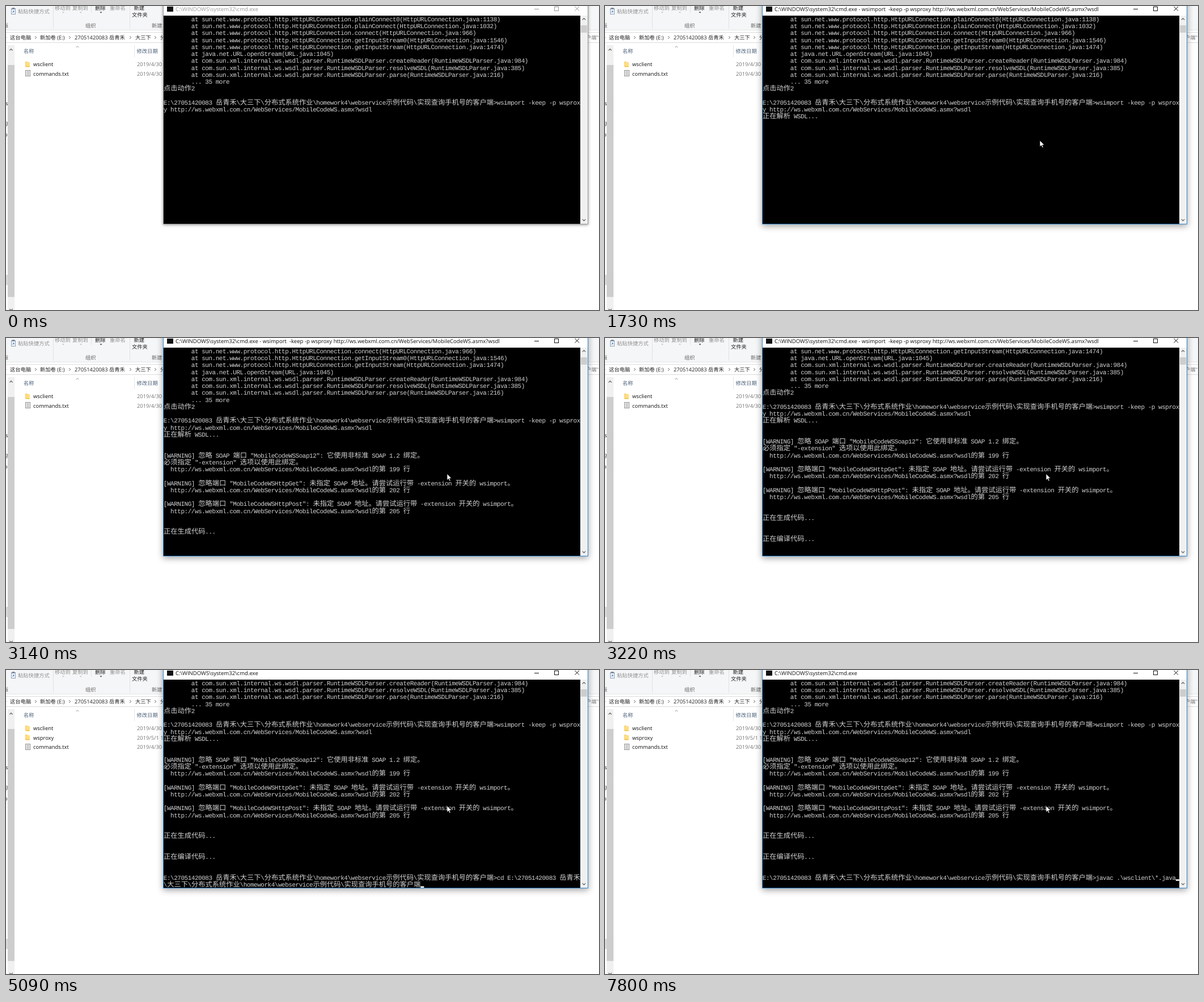
Write an HTML page with a canvas that moves like this. It is 1046 px wide and 536 px high and loops after 8000 ms.

```html
<!DOCTYPE html>
<html lang="zh-CN">
<head>
<meta charset="utf-8">
<title>wsimport</title>
<style>
html, body { margin: 0; width: 100%; height: 100%; overflow: hidden; background: #fff; }
canvas { display: block; }
</style>
</head>
<body>
<canvas id="stage" width="1046" height="536"></canvas>
<script>
const ctx = document.getElementById("stage").getContext("2d");
const LOOP = 8000;
const UI = '"Open Sans", "Noto Sans CJK SC", "Noto Sans CJK", sans-serif';
const LATIN = '11px "Liberation Mono", monospace';
const HAN = '300 12.25px "Noto Sans CJK SC", "Noto Sans CJK", sans-serif';
const COLS = 120, CELL = 6.125, ROW = 12.25, LEFT = 278, TOP = 17;

// Console contents
const OWNER = "27051420083 岳青禾";
const DIR = `E:\\${OWNER}\\大三下\\分布式系统作业\\homework4\\webservice示例代码\\实现查询手机号的客户端`;
const URL_WSDL = "http://ws.webxml.com.cn/WebServices/MobileCodeWS.asmx?wsdl";
const IMPORT = "wsimport -keep -p wsproxy " + URL_WSDL;
const TITLE = "C:\\WINDOWS\\system32\\cmd.exe";
const at = (pkg, method, file, line) => `        at ${pkg}.${method}(${file}.java:${line})`;
const http = (method, line) =>
  at("sun.net.www.protocol.http.HttpURLConnection", method, "HttpURLConnection", line);
const parser = (method, line) =>
  at("com.sun.xml.internal.ws.wsdl.parser.RuntimeWSDLParser", method, "RuntimeWSDLParser", line);
const lineOf = n => `  ${URL_WSDL}的第 ${n} 行`;
const noAddress = port =>
  `[WARNING] 忽略端口 "MobileCodeWS${port}": 未指定 SOAP 地址。请尝试运行带 -extension 开关的 wsimport。`;

const TRACE = [
  http("plainConnect0", 1138), http("plainConnect", 1032), http("connect", 966),
  http("getInputStream0", 1546), http("getInputStream", 1474),
  at("java.net.URL", "openStream", "URL", 1045),
  parser("createReader", 984), parser("resolveWSDL", 385), parser("parse", 216),
  "        ... 35 more", "点击动作2", "", DIR + ">" + IMPORT
];
const PARSING = ["正在解析 WSDL...", "", ""];
const WARNINGS = [
  '[WARNING] 忽略 SOAP 端口 "MobileCodeWSSoap12": 它使用非标准 SOAP 1.2 绑定。',
  '必须指定 "-extension" 选项以使用此绑定。', lineOf(199), "",
  noAddress("HttpGet"), lineOf(202), "",
  noAddress("HttpPost"), lineOf(205), "", "",
  "正在生成代码...", "", ""
];
const COMPILING = ["正在编译代码...", "", ""];

function consoleLines(t) {
  const lines = [...TRACE];
  if (t >= 1730) lines.push(...PARSING);
  if (t >= 3140) lines.push(...WARNINGS);
  if (t >= 3220) lines.push(...COMPILING);
  if (t >= 4140) {
    const command = t < 5090 ? IMPORT : t < 5630 ? "cd " + DIR : "javac .\\wsclient\\*.java";
    lines.push(DIR + ">" + command);
  }
  return lines;
}

const scrollAt = t => t < 3140 ? 0 : t < 3220 ? 2 : t < 4140 ? 4 : 6;

// Caret periods: start, end, column, screen row
const CARETS = [
  [990, 1350, 60, 13], [1350, 1510, 0, 14], [2510, 3060, 0, 17],
  [4140, 4630, 60, 29], [5090, 5630, 74, 29],
  [5800, 6270, 119, 28], [6790, 7260, 119, 28], [7800, 8000, 119, 28]
];

function box(x, y, w, h, color) {
  ctx.fillStyle = color;
  ctx.fillRect(x, y, w, h);
}

function label(text, x, mid, color = "#222", size = 9.3) {
  ctx.font = `${size}px ${UI}`;
  ctx.fillStyle = color;
  ctx.fillText(text, x, mid + size * 0.36);
}

function stroke(color, width, ...points) {
  ctx.strokeStyle = color;
  ctx.lineWidth = width;
  ctx.beginPath();
  points.forEach(([x, y]) => ctx.lineTo(x, y));
  ctx.stroke();
}

// Small open arrowhead: dx, dy give the direction of its tip
function chevron(x, y, dx, dy, color = "#444", s = 2.6, width = 1.1) {
  const back = (side) => [x - dx * s / 2 + dy * side * s, y - dy * s / 2 + dx * side * s];
  stroke(color, width, back(-1), [x + dx * s / 2, y + dy * s / 2], back(1));
}

function dropMark(x, y, color) {
  ctx.fillStyle = color;
  ctx.beginPath();
  ctx.moveTo(x - 2, y - 1);
  ctx.lineTo(x + 2, y - 1);
  ctx.lineTo(x, y + 1);
  ctx.fill();
}

function folder(y) {
  box(34, y - 5, 4, 9, "#f4cf66");
  box(35, y - 4, 7, 9, "#ffdd83");
  box(34, y + 3, 7, 1, "#eabf52");
}

function textFile(y) {
  box(34, y - 6, 9, 11, "#8c8c8c");
  box(35, y - 5, 7, 9, "#fff");
  for (let i = 0; i < 4; i++) box(36, y - 4 + i * 2, 5, 1, "#a0a0a0");
}

function drawRibbon() {
  const gray = "#929292", group = "#666";
  box(0, 0, 1046, 42, "#f5f6f7");
  box(0, 42, 1046, 1, "#e3e4e5");
  for (const x of [83, 218]) box(x, 0, 1, 40, "#e1e2e3");
  box(150, 0, 1, 12, "#e1e2e3");
  box(9, 4, 8, 11, "#8fa0b3");
  box(10, 6, 6, 8, "#f3f7fb");
  box(11, 3, 4, 2, "#71849a");
  stroke("#5285bd", 1, [11.5, 12], [14, 9], [12, 9], [14, 9], [14, 11]);
  label("粘贴快捷方式", 21, 9.5, gray);
  label("移动到", 86, 4, gray);
  label("复制到", 117, 4, gray);
  label("删除", 157, 4);
  label("重命名", 183, 4, gray);
  label("新建", 225.5, 4);
  label("文件夹", 222, 16);
  dropMark(101, 11.5, "#bbb");
  dropMark(132, 11.5, "#bbb");
  dropMark(167.5, 11.5, "#222");
  label("板", -5, 34.5, group);
  label("组织", 140, 34.5, group);
  label("新建", 257, 34.5, group);
}

function drawAddress() {
  box(0, 46, 1046, 1, "#dcdcdc");
  box(0, 64, 1046, 1, "#dcdcdc");
  label("这台电脑", 7, 55.5);
  label("新加卷 (E:)", 60, 55.5);
  label(OWNER, 121, 55.5);
  label("大三下", 228, 55.5);
  label("分布式系统作业", 272, 55.5);
  for (const x of [-1, 52.5, 112.5, 219.5, 263.5]) chevron(x, 55.5, 1, 0, "#555", 2.3, 1);
  label('户端"', 1023, 56, "#777");
}

function drawFiles(t) {
  label("s", -1, 172);
  label("的", -6, 208);
  label("o", -3, 227);
  box(0, 474, 3, 18, "#d9d9d9");
  box(3, 69, 12, 467, "#f0f0f0");
  box(3, 104, 12, 409, "#cdcdcd");
  chevron(9, 77, 0, -1);
  chevron(9, 535.5, 0, 1);
  label("名称", 31, 80, "#4c607a");
  label("修改日期", 230.5, 80, "#4c607a");
  chevron(126, 72, 0, -1, "#777", 2.4, 0.8);
  box(226, 69, 1, 21, "#e5e5e5");

  const files = [["wsclient", "2019/4/30"], ["commands.txt", "2019/4/30"]];
  if (t >= 4220) files.splice(1, 0, ["wsproxy", "2019/5/1 10:23"]);
  files.forEach(([name, date], i) => {
    const y = 103 + i * 16.5;
    (name.endsWith(".txt") ? textFile : folder)(Math.round(y - 0.5));
    label(name, 48, y, "#111", 9.4);
    label(date, 231, y, "#747474");
  });
}

function drawWindow(t) {
  const active = t >= 430;
  const ink = active ? "#111" : "#999";
  ctx.save();
  ctx.shadowColor = active ? "rgba(0,0,0,.38)" : "rgba(0,0,0,.42)";
  ctx.shadowBlur = active ? 11 : 5;
  ctx.shadowOffsetY = active ? 3 : 1;
  box(277, -12, 750, 397, active ? "#2f86cf" : "#9a9a9a");
  ctx.restore();
  box(278, 0, 748, 17, "#fff");
  box(284, 1, 11, 9, "#111");
  const running = t >= 1350 && t < 4140;
  label(TITLE + (running ? " - " + IMPORT.replace(" ", "  ") : ""), 299, 5.2, ink, 9.55);
  box(932, 5, 8, 1, ink);
  ctx.strokeStyle = ink;
  ctx.lineWidth = 1;
  ctx.strokeRect(967.5, 1.5, 7, 7);
  stroke(ink, 1, [1003.5, 1], [1011, 8.5]);
  stroke(ink, 1, [1011, 1], [1003.5, 8.5]);

  box(LEFT, TOP, 735, 367, "#000");
  box(1013, TOP, 13, 367, "#f0f0f0");
  box(1014, 34, 11, 13, "#cdcdcd");
  chevron(1019.5, 23, 0, -1);
  chevron(1019.5, 377.5, 0, 1);
}

function drawConsole(t) {
  let row = -scrollAt(t);
  ctx.save();
  ctx.beginPath();
  ctx.rect(LEFT, TOP, 735, 367);
  ctx.clip();
  ctx.fillStyle = "#d2d2d2";
  for (const line of consoleLines(t)) {
    let col = 0;
    for (const ch of line) {
      const wide = ch > "\u2e80";
      if (col >= COLS) { col = 0; row++; }
      if (row >= 0 && ch !== " ") {
        ctx.font = wide ? HAN : LATIN;
        ctx.fillText(ch, LEFT + col * CELL - (wide ? 0 : 0.2), TOP + row * ROW + 9.9);
      }
      col += wide ? 2 : 1;
    }
    row++;
  }
  for (const [from, to, col, r] of CARETS)
    if (t >= from && t < to) box(LEFT + col * CELL, TOP + r * ROW + 9, CELL, 2.8, "#eee");
  ctx.restore();
}

function drawPointer(t) {
  if (t < 70) return;
  const p = Math.min(1, (Math.floor((t - 70) / 71) + 1) / 8);
  const rest = (1 - p) ** 2;
  const [x, y] = t < 2510 ? [767 + 10 * rest, 237 + 290 * rest] : [778, 239.5];
  ctx.save();
  ctx.translate(x, y);
  const arrow = new Path2D("M0 0V11.2L2.6 8.8L4.4 12.8L6.2 12L4.4 8.1H8Z");
  ctx.fillStyle = "#fff";
  ctx.fill(arrow);
  ctx.strokeStyle = "#000";
  ctx.lineWidth = 0.7;
  ctx.stroke(arrow);
  ctx.restore();
}

function draw(t) {
  box(0, 0, 1046, 536, "#fff");
  drawRibbon();
  drawAddress();
  drawFiles(t);
  drawWindow(t);
  drawConsole(t);
  drawPointer(t);
}

ctx.textRendering = "geometricPrecision";
const start = performance.now();
function tick() {
  draw((performance.now() - start) % LOOP);
  requestAnimationFrame(tick);
}
tick();
</script>
</body>
</html>
```
